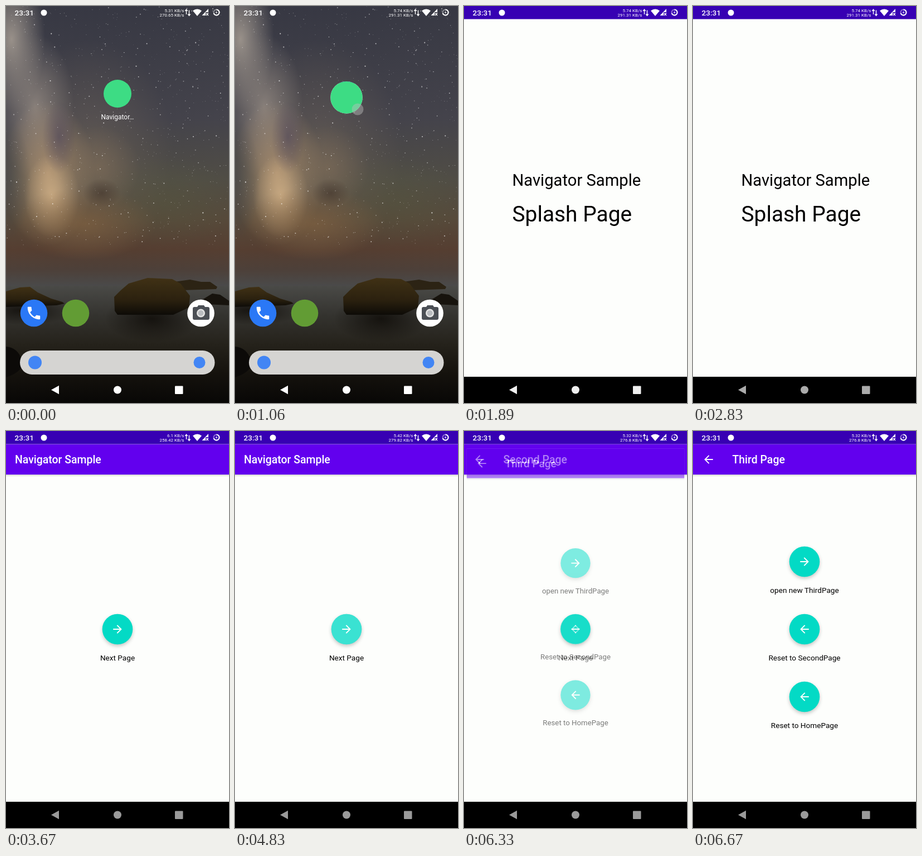
An HTML page for the animation above (8000 ms loop, 400 by 711 pixels).

```html
<!DOCTYPE html>
<html lang="en">
<head>
<meta charset="utf-8">
<title>Navigator Sample</title>
<style>
  html, body { margin: 0; width: 100%; height: 100%; overflow: hidden; background: #000; }
  svg { display: block; width: 100vw; height: 100vh; }
  text { font-family: Roboto, "Open Sans", sans-serif; }
  .bold { font-weight: 500; }
  .fab { filter: drop-shadow(0 3px 3px rgba(0, 0, 0, .22)); }
</style>
</head>
<body>
<svg id="stage" viewBox="0 0 400 711">
  <defs>
    <linearGradient id="sky" x1="0" y1="0" x2="0" y2="1">
      <stop offset="0" stop-color="#373843"/>
      <stop offset=".4" stop-color="#44434b"/>
      <stop offset=".62" stop-color="#504d45"/>
      <stop offset=".76" stop-color="#56493a"/>
      <stop offset=".87" stop-color="#553e31"/>
      <stop offset=".94" stop-color="#4d4039"/>
      <stop offset="1" stop-color="#4a4a4a"/>
    </linearGradient>
    <linearGradient id="sea" x1="0" y1="0" x2="0" y2="1">
      <stop offset="0" stop-color="#4a4a47"/>
      <stop offset=".25" stop-color="#34332f"/>
      <stop offset=".5" stop-color="#25221b"/>
      <stop offset=".75" stop-color="#15120d"/>
      <stop offset="1" stop-color="#080706"/>
    </linearGradient>
    <linearGradient id="rock" x1="0" y1="0" x2="0" y2="1">
      <stop offset="0" stop-color="#403115"/>
      <stop offset=".6" stop-color="#2b210f"/>
      <stop offset="1" stop-color="#0d0b07"/>
    </linearGradient>
    <radialGradient id="shade">
      <stop stop-color="#0e0b07" stop-opacity=".8"/>
      <stop offset="1" stop-color="#0e0b07" stop-opacity="0"/>
    </radialGradient>
    <linearGradient id="barShade" x1="0" y1="0" x2="0" y2="1">
      <stop offset="0" stop-opacity=".16"/>
      <stop offset="1" stop-opacity="0"/>
    </linearGradient>
    <clipPath id="crop"><rect id="cropBox" width="400" height="711"/></clipPath>
    <clipPath id="content"><rect y="23.5" width="400" height="640.5"/></clipPath>
    <path id="next" d="M12 4l-1.41 1.41L16.17 11H4v2h12.17l-5.58 5.59L12 20l8-8z"/>
    <path id="prev" d="M20 11H7.83l5.59-5.59L12 4l-8 8 8 8 1.41-1.41L7.83 13H20v-2z"/>
  </defs>

  <g id="home">
    <g id="wall">
      <rect width="400" height="502" fill="url(#sky)"/>
      <g id="glow"></g>
      <g id="stars" fill="#fff"></g>
      <rect y="501" width="400" height="210" fill="url(#sea)"/>
      <ellipse cx="262" cy="560" rx="85" ry="42" fill="url(#shade)"/>
      <ellipse cx="30" cy="545" rx="95" ry="26" fill="url(#shade)"/>
      <path d="M302 494l28-4 20 4 16 0 13 9-2 4-60 2z" fill="#2c2314"/>
      <path d="M352 526l18-11 14 2 16 11v8l-42-2z" fill="#17130d"/>
      <path d="M0 511l25-7 18-1 14 10 24 11 20 6 4 3-14 3-91 3z" fill="url(#rock)"/>
      <path d="M195 546l-1-25 12-12 14-12 34-10 44 2 15 8 17 22-2 21-28 13h-100z" fill="url(#rock)"/>
      <path d="M0 610q22 2 28 24 6 20-28 31z" fill="#0c0a08"/>
    </g>
    <g id="label">
      <circle cx="200" cy="157" r="25" fill="#3ddc84"/>
      <text x="200" y="203" font-size="12" text-anchor="middle" fill="#fff">Navigator…</text>
    </g>
    <g id="dock">
      <circle cx="50" cy="550" r="24.3" fill="#2a78f6"/>
      <path transform="translate(35 535) scale(1.25)" fill="#fff" d="M6.62 10.79c1.44 2.83 3.76 5.14 6.59 6.59l2.2-2.2c.27-.27.67-.36 1.02-.24 1.12.37 2.33.57 3.57.57.55 0 1 .45 1 1V20c0 .55-.45 1-1 1C10.61 21 3 13.39 3 4c0-.55.45-1 1-1h3.5c.55 0 1 .45 1 1 0 1.25.2 2.45.57 3.57.11.35.03.74-.25 1.02z"/>
      <circle cx="125" cy="550" r="24.3" fill="#629c34"/>
      <circle cx="349.5" cy="550" r="24.3" fill="#fff"/>
      <path d="M338 539h5l2-3h10l2 3h5q3 0 3 3v17q0 3-3 3h-24q-3 0-3-3v-17q0-3 3-3z" fill="#4b4f55"/>
      <circle cx="349.5" cy="550" r="7.5" fill="#e4e4e4"/>
      <circle cx="349.5" cy="550" r="5" fill="#b9bcc0"/>
      <rect x="25" y="617" width="349.5" height="43" rx="21.5" fill="#d5d4d2"/>
      <circle cx="52" cy="638.5" r="12" fill="#4285f4"/>
      <circle cx="347" cy="638.5" r="10.5" fill="#4285f4"/>
    </g>
  </g>

  <g id="win">
    <g clip-path="url(#crop)">
      <rect width="400" height="711" fill="#fdfefc"/>
      <g id="splash">
        <text x="86.5" y="322" font-size="29.2">Navigator Sample</text>
        <text x="86.5" y="386" font-size="38.9">Splash Page</text>
      </g>
      <g id="pages" clip-path="url(#content)"></g>
      <rect width="400" height="23.5" fill="#3700b3"/>
      <rect y="664" width="400" height="47"/>
      <rect id="cover" width="400" height="711" fill="#3ddc84"/>
    </g>
  </g>

  <circle id="touch" r="10.5" fill="#bdbdbd"/>

  <g id="status" fill="#fff">
    <text class="bold" x="15.5" y="17" font-size="13.6">23:31</text>
    <circle cx="68" cy="12" r="5.5"/>
    <g font-size="8" text-anchor="end">
      <text id="up" x="319.5" y="10.5"></text>
      <text id="down" x="319.5" y="19"></text>
    </g>
    <path d="M323.5 5l3 4h-2.3v6h-1.4v-6h-2.3zM328.5 18.5l-3-4h2.3v-7h1.4v7h2.3z"/>
    <path d="M335 8.5q8-6 16 0l-8 9.5z"/>
    <path d="M363 5v6h-5v6h-6.5z"/>
    <path d="M359 12.5l4 4.5m0-4.5l-4 4.5" stroke="#fff" stroke-width="1.3"/>
    <circle cx="377.5" cy="11.5" r="5" fill="none" stroke="#fff" stroke-opacity=".45" stroke-width="2"/>
    <path d="M377.5 6.5a5 5 0 1 1-4.8 6.4" fill="none" stroke="#fff" stroke-width="2"/>
    <path d="M378.5 8.5l-3 3.5h2l-1 2.5 3-3.5h-2z"/>
  </g>
  <g id="nav">
    <path d="M81 687.5l14-7.800v15.6z"/>
    <circle cx="200" cy="687.5" r="7"/>
    <rect x="303" y="680.5" width="14.5" height="14.5" rx="1"/>
  </g>
</svg>
<script>
const LOOP = 8000;
const $ = id => document.getElementById(id);
const set = (id, attrs) => { for (const k in attrs) $(id).setAttribute(k, attrs[k]); };
const ramp = (t, a, b) => Math.min(1, Math.max(0, (t - a) / (b - a)));
const mix = (a, b, k) => a + (b - a) * k;
const bez = (u, a, b, c, d) => {
  const v = 1 - u;
  return v * v * v * a + 3 * v * v * u * b + 3 * v * u * u * c + u * u * u * d;
};

// Solves a cubic curve for y at x, given x and y control values.
function curve(x, xs, ys) {
  let lo = 0, hi = 1;
  for (let i = 0; i < 24; i++) {
    const m = (lo + hi) / 2;
    if (bez(m, ...xs) < x) lo = m; else hi = m;
  }
  return bez(lo, ...ys);
}

// Slow start, sudden rise, long settle.
function launchEase(x) {
  if (x <= 0) return 0;
  if (x >= 1) return 1;
  return x < 1 / 6
    ? curve(x, [0, .05, .13333, 1 / 6], [0, 0, .06, .4])
    : curve(x, [1 / 6, .20833, .25, 1], [.4, .82, 1, 1]);
}

function paintSky() {
  const blobs = [
    [150, 260, 150, 200, "#75685a", .5], [290, 350, 130, 80, "#55583f", .4],
    [10, 60, 60, 130, "#b8ada0", .75], [52, 180, 70, 130, "#a1968c", .7],
    [75, 300, 85, 130, "#c4a078", .7], [82, 340, 50, 75, "#ecc898", .6],
    [165, 290, 75, 75, "#8a745c", .5], [140, 390, 130, 65, "#866440", .6],
    [95, 235, 30, 65, "#484058", .55], [172, 335, 34, 26, "#40332a", .6],
    [0, 310, 45, 110, "#46474a", .6]
  ];
  $("glow").innerHTML = blobs.map(([x, y, rx, ry, c, o], i) =>
    `<radialGradient id="b${i}"><stop stop-color="${c}" stop-opacity="${o}"/>` +
    `<stop offset="1" stop-color="${c}" stop-opacity="0"/></radialGradient>` +
    `<ellipse cx="${x}" cy="${y}" rx="${rx}" ry="${ry}" fill="url(#b${i})"/>`).join("");
  let seed = 7;
  const rnd = () => (seed = seed * 16807 % 2147483647) / 2147483647;
  let out = "";
  for (let i = 0; i < 800; i++) {
    const x = rnd() * 400, y = rnd() * 430, r = .4 + .7 * rnd() ** 4;
    out += `<circle cx="${x.toFixed(1)}" cy="${y.toFixed(1)}" r="${r.toFixed(2)}" opacity="${(.25 + .5 * rnd()).toFixed(2)}"/>`;
  }
  $("stars").innerHTML = out;
}

const icon = (name, x, y) =>
  `<use href="#${name}" fill="#fff" transform="translate(${x} ${y}) scale(.973) translate(-12 -12)"/>`;

const button = ([y, arrow, label]) =>
  `<circle class="fab" cx="200" cy="${y}" r="27.3" fill="#03dac5"/>` + icon(arrow, 200, y) +
  `<text x="200" y="${y + 56}" font-size="13.6" text-anchor="middle">${label}</text>`;

const page = (id, title, back, buttons) =>
  `<g id="${id}"><rect y="23.5" width="400" height="641" fill="#fdfefc"/>
  <rect y="78" width="400" height="4" fill="url(#barShade)"/>
  <rect y="23.5" width="400" height="54.5" fill="#6200ee"/>
  ${back ? icon("prev", 28, 51) : ""}
  <text class="bold" x="${back ? 70.5 : 16}" y="58" font-size="19.45" fill="#fff">${title}</text>
  ${buttons.map(button).join("")}</g>`;

paintSky();
$("pages").innerHTML =
  page("first", "Navigator Sample", false, [[355, "next", "Next Page"]]) +
  page("second", "Second Page", true, [[355, "next", "Next Page"]]) +
  `<circle id="ripple" cx="200" cy="355" fill="#fff"/>` +
  page("third", "Third Page", true, [
    [234, "next", "open new ThirdPage"],
    [355, "prev", "Reset to SecondPage"],
    [476, "prev", "Reset to HomePage"]
  ]);

const rates = [
  [0, "5.31", "270.65"], [440, "5.74", "291.31"], [3670, "6.1", "258.42"],
  [4440, "5.42", "279.82"], [6060, "5.32", "276.8"]
];
const taps = [[830, 1100, 220, 185], [4610, 4800, 211, 363], [6060, 6240, 211, 363]];

// The icon grows as a circle first; the crop then opens downwards.
function drawWindow(t) {
  const k = launchEase(ramp(t, 1028, 1675));
  const ky = launchEase(ramp(t, 1036, 1430));
  const w = mix(50, 400, k), s = w / 400;
  const h = w * mix(1, 711 / 400, launchEase(ramp(t, 1060, 1530)));
  const top = mix(157, 355.5, ky) - h / 2;
  const r = Math.min(w / 2, 29 * (1 - k) ** .6);
  set("win", {
    visibility: t < 1028 ? "hidden" : "visible",
    transform: `translate(${200 - w / 2} ${top}) scale(${s})`
  });
  set("cropBox", { height: h / s, rx: r / s });
  set("cover", { opacity: 1 - ramp(t, 1065, 1170) });
  set("label", { opacity: t < 1028 ? 1 : 0 });
  set("dock", { opacity: 1 - ramp(t, 1070, 1200) });
  set("home", { display: t < 1680 ? "inline" : "none" });
}

function showPage(id, k) {
  const s = mix(.94, 1, 1 - (1 - k) ** 4);
  set(id, {
    display: k > 0 ? "inline" : "none",
    opacity: Math.min(1, k * 2.5),
    transform: `translate(200 344) scale(${s}) translate(-200 -344)`
  });
}

function drawTouch(t) {
  const tap = taps.find(p => t >= p[0] && t < p[1]);
  set("touch", tap ? { cx: tap[2], cy: tap[3], opacity: .45 } : { opacity: 0 });
  const press = taps.slice(1).find(p => t >= p[0] && t < p[0] + 450);
  const age = press ? t - press[0] : 0;
  set("ripple", {
    r: mix(8, 27.3, ramp(age, 0, 220)),
    opacity: press ? .24 * (1 - ramp(age, 200, 450)) : 0
  });
}

function frame() {
  const t = performance.now() % LOOP;
  drawWindow(t);
  drawTouch(t);
  set("first", { display: t >= 3670 ? "inline" : "none" });
  showPage("second", ramp(t, 4850, 5260));
  showPage("third", ramp(t, 6250, 6650));
  const [, up, down] = rates.filter(r => t >= r[0]).pop();
  $("up").textContent = up + " KB/s";
  $("down").textContent = down + " KB/s";
  const g = Math.round(mix(255, 154, ramp(t, 1670, 3060)));
  set("nav", { fill: `rgb(${g},${g},${g})` });
  requestAnimationFrame(frame);
}
frame();
</script>
</body>
</html>
```
